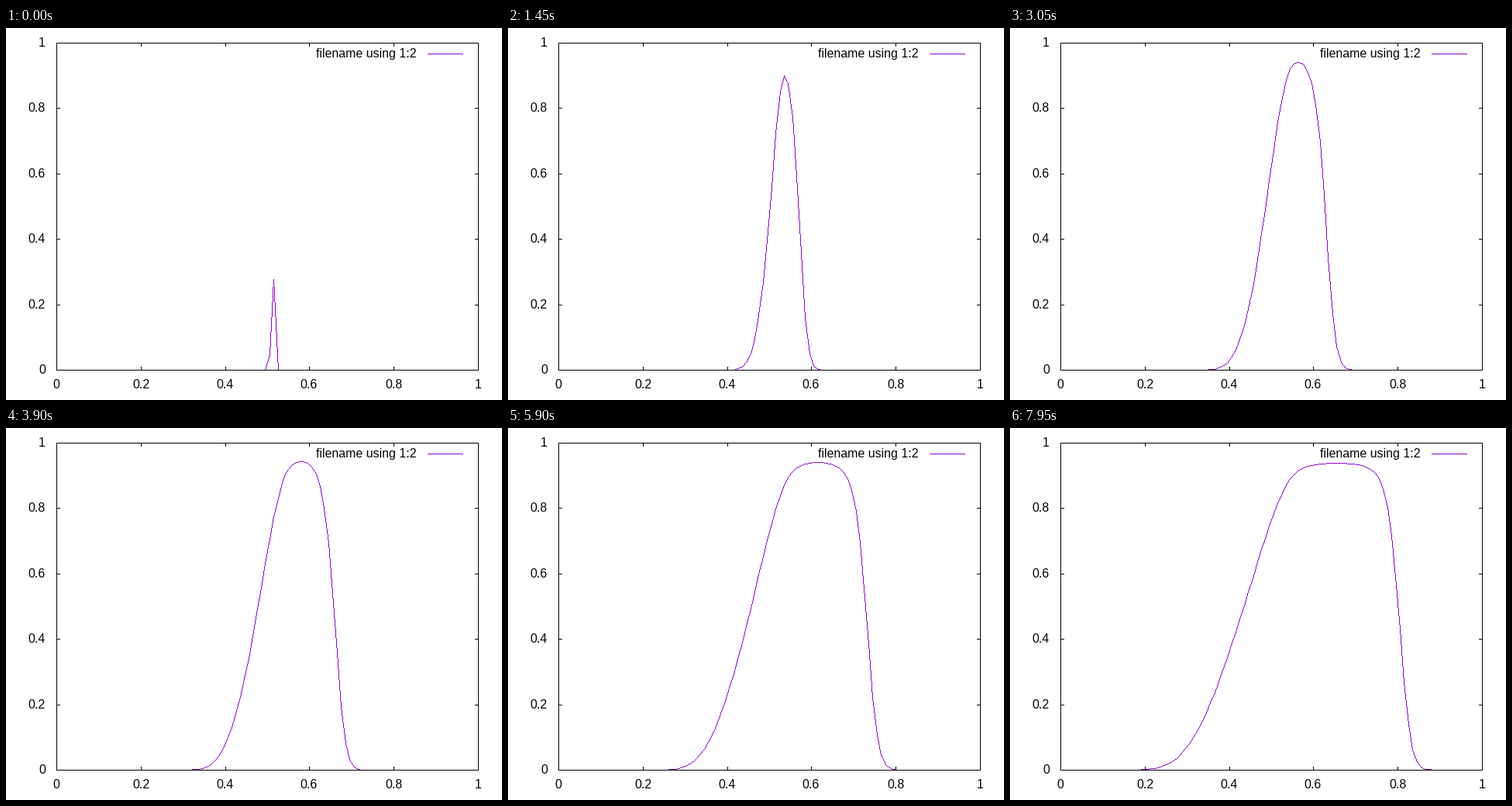
Write a matplotlib script that moves like this. It is 640 px wide and 480 px high and loops after 8000 ms.

```python
import numpy as np
import matplotlib
import matplotlib.pyplot as plt
from matplotlib.animation import FuncAnimation

matplotlib.rcParams["font.family"] = "Liberation Sans"
matplotlib.rcParams["text.hinting"] = "native"

W, H, DPI = 640, 480, 100
LEFT, RIGHT, TOP, BOTTOM = 65, 609, 19, 441
PX = 72 / DPI
PURPLE = "#9400d3"
FRAMES, STEP_MS = 160, 50

# Shock tube solved with first-order flux-vector splitting
GAMMA = 1.4
CELLS, DX, DT = 100, 0.01, 0.001


def split_flux(rho, u, c, sign):
    def part(s):
        return (s + sign * np.abs(s)) / 2

    l1, l2, l3 = part(u), part(u + c), part(u - c)
    g = GAMMA - 1
    w = (3 - GAMMA) * (l2 + l3) * c**2 / (2 * g)
    return rho / (2 * GAMMA) * np.array([
        2 * g * l1 + l2 + l3,
        2 * g * l1 * u + l2 * (u + c) + l3 * (u - c),
        g * l1 * u**2 + (l2 * (u + c)**2 + l3 * (u - c)**2) / 2 + w,
    ])


def solve():
    left = np.arange(CELLS) <= CELLS // 2
    rho = np.where(left, 1.0, 0.125)
    p = np.where(left, 1.0, 0.1)
    q = np.array([rho, 0 * rho, p / (GAMMA - 1)])
    history = []
    for _ in range(FRAMES):
        rho, u = q[0], q[1] / q[0]
        p = (GAMMA - 1) * (q[2] - rho * u**2 / 2)
        c = np.sqrt(GAMMA * p / rho)
        flux = (split_flux(rho, u, c, 1)[:, :-1]
                + split_flux(rho, u, c, -1)[:, 1:])
        q[:, 1:-1] -= DT / DX * np.diff(flux, axis=1)
        history.append(q[1] / q[0])
    return history


def to_px(x, y):
    px = np.floor(LEFT + np.asarray(x) * (RIGHT - LEFT) + 0.5)
    py = np.floor(BOTTOM - np.asarray(y) * (BOTTOM - TOP) + 0.5)
    return px.astype(int), py.astype(int)


def rasterize(xs, ys):
    # One-pixel polyline without smoothing, on a transparent layer
    layer = np.zeros((H, W, 4))
    for x0, y0, x1, y1 in zip(xs, ys, xs[1:], ys[1:]):
        n = max(abs(x1 - x0), abs(y1 - y0)) + 1
        cols = np.floor(np.linspace(x0, x1, n) + 0.5).astype(int)
        rows = np.floor(np.linspace(y0, y1, n) + 0.5).astype(int)
        layer[rows, cols] = matplotlib.colors.to_rgba(PURPLE)
    return layer


velocity = solve()
centres = (np.arange(CELLS) + 0.5) * DX

fig = plt.figure(figsize=(W / DPI, H / DPI), dpi=DPI, facecolor="white")
ax = fig.add_axes([0, 0, 1, 1])
ax.axis("off")
curve = ax.imshow(np.zeros((H, W, 4)), extent=(0, W, H, 0), aspect="auto",
                  interpolation="nearest", zorder=2)
ax.set_xlim(0, W)
ax.set_ylim(H, 0)


def stroke(x0, y0, x1, y1, color="black"):
    # One-pixel horizontal or vertical bar, both ends included
    ax.add_patch(plt.Rectangle((x0, y0), x1 - x0 + 1, y1 - y0 + 1, fc=color,
                               lw=0, antialiased=False, zorder=3))


def label(x, baseline, text, align):
    ax.text(x, baseline, text, ha=align, va="baseline", fontsize=16 * PX,
            color="black", zorder=4)


for y in (TOP, BOTTOM):
    stroke(LEFT, y, RIGHT, y)
for x in (LEFT, RIGHT):
    stroke(x, TOP, x, BOTTOM)

TICK, GAP = 4, 14
for k in range(6):
    v = k / 5
    x, y = to_px(v, v)
    stroke(x, BOTTOM - TICK, x, BOTTOM)
    stroke(x, TOP, x, TOP + TICK)
    stroke(LEFT, y, LEFT + TICK, y)
    stroke(RIGHT - TICK, y, RIGHT, y)
    label(x, BOTTOM + 24, f"{v:g}", "center")
    label(LEFT - GAP, y + 5, f"{v:g}", "right")

KEY_X = 544
label(KEY_X - GAP, 38, "filename using 1:2", "right")
stroke(KEY_X, 33, KEY_X + 45, 33, PURPLE)


def draw(i):
    curve.set_data(rasterize(*to_px(centres, velocity[i])))
    return curve,


anim = FuncAnimation(fig, draw, frames=FRAMES, interval=STEP_MS,
                     repeat=True, repeat_delay=0, blit=False)
plt.show()
```
